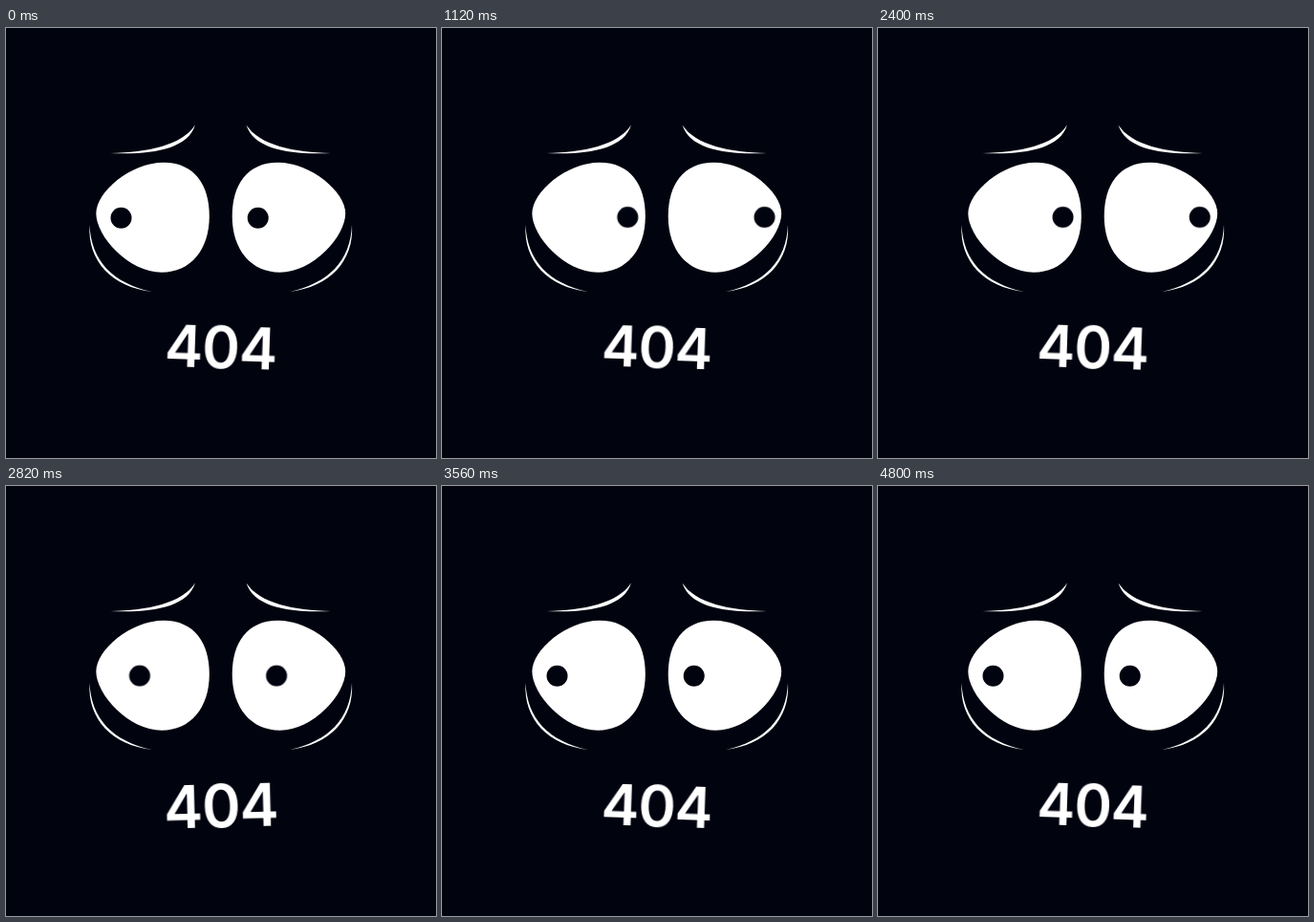
Recreate the animation shown at these times as an HTML page. Size 450x450 px, loop 4.82 s.

```html
<!DOCTYPE html>
<html lang="en">
<head>
<meta charset="utf-8">
<title>404</title>
<style>
  html, body { margin: 0; width: 100%; height: 100%; overflow: hidden; background: #01030f; }
  svg { display: block; width: 100vw; height: 100vh; fill: #fff; }

  .pupil { fill: #01030f; animation: look 4820ms infinite; }
  .code {
    font: 600 60px Inter, sans-serif;
    letter-spacing: -1px;
    text-anchor: middle;
    transform-origin: 225.2px 334.3px;
    animation: tilt 602.5ms cubic-bezier(.37, 0, .63, 1) -60ms infinite alternate,
               swell 602.5ms cubic-bezier(.37, 0, .63, 1) -330ms infinite alternate;
  }

  /* Glance right, hold, glance back, hold */
  @keyframes look {
    0%, .415% { transform: none; animation-timing-function: ease; }
    21.16% { transform: translate(73.8px, -.8px); }
    49.38% { transform: translate(73.8px, -.8px); animation-timing-function: ease; }
    70.12%, 100% { transform: none; }
  }
  @keyframes tilt { from { rotate: 2deg; } to { rotate: -2deg; } }
  @keyframes swell { from { scale: .965; } to { scale: 1.035; } }
</style>
</head>
<body>
<svg viewBox="0 0 450 450">
  <defs>
    <g id="side">
      <path d="M109.5 131C148 130 184 123 198 101.5C190 127 152 133 109.5 131Z"/>
      <path d="M94.3 194C94.3 172 130 140.8 165 140.8C197 140.8 212.8 164 212.8 197C212.8 232 193 255.7 163 255.7C128 255.7 94.3 218 94.3 194Z"/>
      <path d="M87.5 206C89 244 112 267 152.5 276C111 271 85 244 87.5 206Z"/>
    </g>
  </defs>
  <use href="#side"/>
  <use href="#side" transform="matrix(-1 0 0 1 449.5 0)"/>
  <circle class="pupil" cx="120.5" cy="198.8" r="11"/>
  <circle class="pupil" cx="263.7" cy="198.8" r="11"/>
  <text class="code" x="224.7" y="356">404</text>
</svg>
</body>
</html>
```
